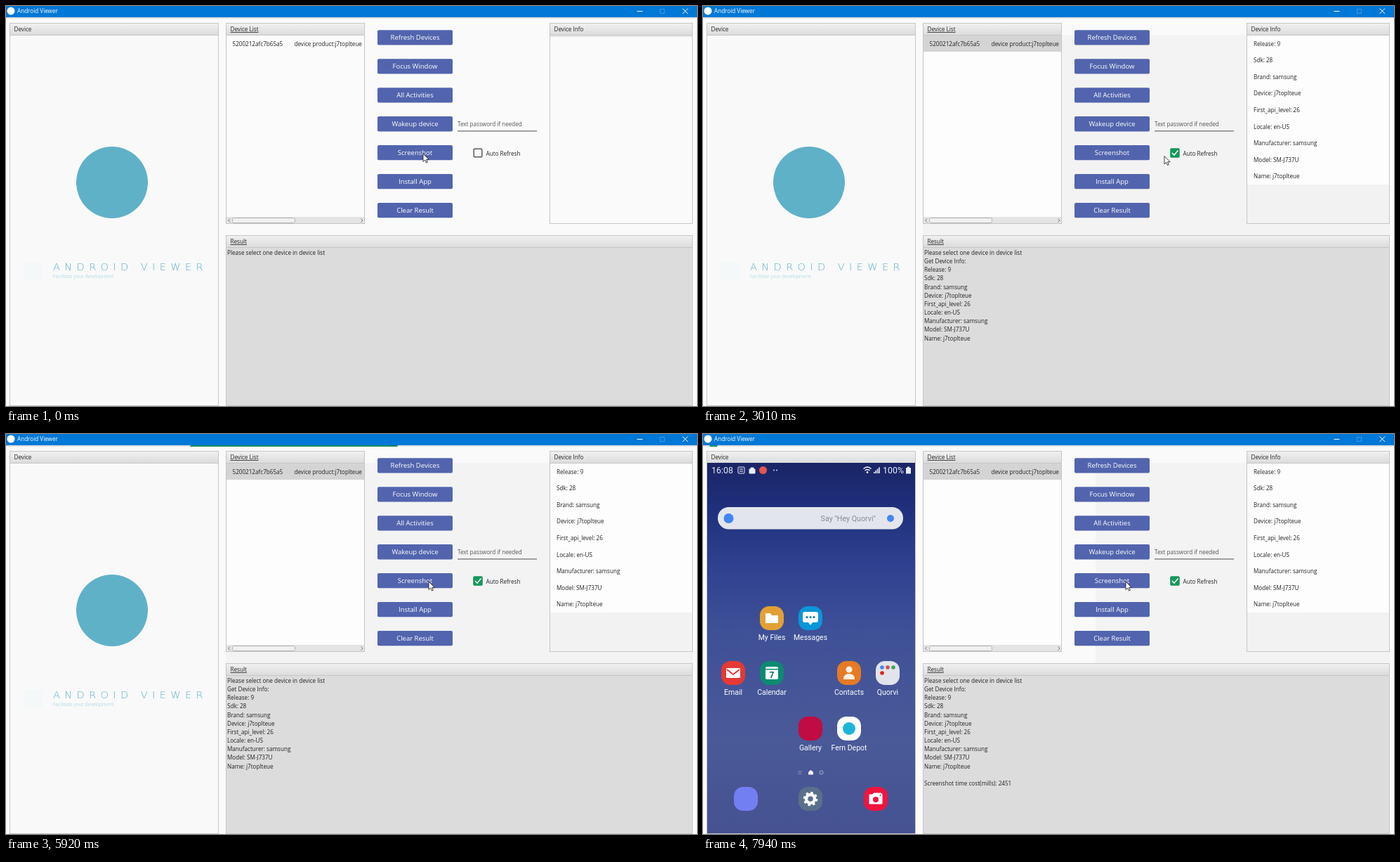
An HTML page for the animation above (8000 ms loop, 984 px wide and 569 px high).

```html
<!DOCTYPE html>
<html lang="en">
<head>
<meta charset="utf-8">
<title>Android Viewer</title>
<style>
  html, body { margin: 0; width: 100%; height: 100%; overflow: hidden; background: #fafafa; }
  svg { display: block; width: 984px; height: 569px; }
  text { font: 8.15px "Open Sans", "Noto Sans", sans-serif; fill: #222; white-space: pre; }
  .btn { font-size: 9.5px; fill: #fff; text-anchor: middle; }
  .app { font: 10.5px Roboto, sans-serif; fill: #fff; text-anchor: middle; }
  .status { font: 12.4px Roboto, sans-serif; fill: #e9ecf7; }
  .hint { font: 10.7px Roboto, sans-serif; fill: #858a99; }
  .brand { font: 200 14.5px "DejaVu Sans", sans-serif; letter-spacing: 6.4px; fill: #58b2c9; }
  .tag { font-size: 7px; font-weight: 300; fill: #8fcbdb; }
  .line { fill: none; stroke: #fff; }
</style>
</head>
<body>
<svg id="stage" viewBox="0 0 984 569">
  <defs>
    <linearGradient id="head" x2="0" y2="1">
      <stop stop-color="#f0f0f0"/><stop offset="1" stop-color="#dcdcdc"/>
    </linearGradient>
    <linearGradient id="wall" x2="0" y2="1">
      <stop stop-color="#1a2566"/><stop offset=".12" stop-color="#1f2f7b"/>
      <stop offset=".28" stop-color="#2f4190"/><stop offset=".45" stop-color="#3e5097"/>
      <stop offset=".75" stop-color="#4a5998"/><stop offset="1" stop-color="#465291"/>
    </linearGradient>
    <clipPath id="list"><rect x="314" y="42" width="196" height="267"/></clipPath>
    <clipPath id="shot"><rect x="529" y="198" width="107" height="21.3" rx="2"/></clipPath>
  </defs>
</svg>
<script>
const NS = 'http://www.w3.org/2000/svg';
const stage = document.getElementById('stage');

function add(tag, attrs, parent = stage, content) {
  const el = document.createElementNS(NS, tag);
  for (const k in attrs) el.setAttribute(k, attrs[k]);
  if (content) el.textContent = content;
  return parent.appendChild(el);
}
const group = (parent, attrs = {}) => add('g', attrs, parent);
const rect = (x, y, width, height, fill, parent, more) =>
  add('rect', { x, y, width, height, fill, ...more }, parent);
const disc = (cx, cy, r, fill, parent, more) => add('circle', { cx, cy, r, fill, ...more }, parent);
const path = (d, parent, more) => add('path', { d, ...more }, parent);
const label = (str, x, y, parent, more) => add('text', { x, y, ...more }, parent, str);
const show = (el, on) => el.setAttribute('display', on ? 'inline' : 'none');

function panel(x, y, w, h, title, fill, underline) {
  const body = rect(x + .5, y + .5, w - 1, h - 1, fill, stage, { stroke: '#c6c6c6' });
  rect(x + 1, y + 1, w - 2, 16, 'url(#head)');
  rect(x + 1, y + 17, w - 2, 1, '#c6c6c6');
  label(title, x + 6.5, y + 12, stage, underline ? { 'text-decoration': 'underline' } : {});
  return body;
}

// Window
rect(0, 0, 984, 569, '#fafafa');
const shade = rect(313, 41, 665, 285, '#f3f3f3');
rect(0, 0, 984, 16, '#0078d7');
rect(0, 16, 984, 2, '#e0e0e0');
disc(7, 7, 5.5, '#fff');
label('Android Viewer', 16, 10, stage, { style: 'fill:#fff' });
path('M898.5 7.5h8', stage, { class: 'line' });
rect(931.5, 4.5, 6, 6, 'none', stage, { stroke: '#3d98e2' });
path('M963.5 3.5l7.5 7.5m0-7.5l-7.5 7.5', stage, { class: 'line' });

// Device panel, empty state
panel(5, 24, 298, 545, 'Device', '#f9f9f9');
const splash = group(stage);
disc(151, 251, 51, '#5fb1c8', splash);
rect(25, 364, 28, 26, '#f5f8f8', splash);
label('ANDROID VIEWER', 67, 375.5, splash, { class: 'brand' });
label('Facilitate your development', 67, 387, splash, { class: 'tag' });

// Phone picture
const phone = group(stage);
rect(6, 41, 296, 527, 'url(#wall)', phone);
label('16:08', 12, 56, phone, { class: 'status' });
rect(50, 47, 9, 9, 'none', phone, { stroke: '#e9ecf7', rx: 1 });
path('M52 50h5m-5 3h5', phone, { class: 'line', 'stroke-width': 1 });
path('M66 50h8v6h-8zM68 50v-2h4v2', phone, { fill: '#e9ecf7', stroke: '#e9ecf7' });
disc(85.5, 51.5, 5.5, '#e2574c', phone);
disc(101, 51.5, .9, '#e9ecf7', phone);
disc(105, 51.5, .9, '#e9ecf7', phone);
path('M228.5 49.5q5.5-5 11 0m-9 2.5q3.5-3 7 0', phone, { class: 'line', 'stroke-width': 1.3 });
disc(234, 54.5, 1.4, '#e9ecf7', phone);
for (let i = 0; i < 4; i++) rect(243 + i * 2.4, 54 - i * 2.2, 1.6, 2 + i * 2.2, '#e9ecf7', phone);
label('100%', 256, 56, phone, { class: 'status' });
path('M289 48h2v-1.5h3V48h2v8.5h-7z', phone, { fill: '#e9ecf7' });

rect(21, 104, 264, 31.5, '#e3e5ec', phone, { rx: 15.7 });
disc(36.5, 120, 7, '#4285f4', phone);
label('Say "Hey Quorvi"', 246, 123.5, phone, { class: 'hint', 'text-anchor': 'end' });
disc(267, 120, 5, '#4285f4', phone);

function app(x, y, fill, name) {
  rect(x - 17, y - 17, 34, 34, fill, phone, { rx: 13 });
  if (name) label(name, x, y + 30.5, phone, { class: 'app' });
  return group(phone, { transform: `translate(${x} ${y})` });
}
const white = { fill: '#fff' };
path('M-9-7h7l2 3h9v11h-18z', app(98, 262, '#e2a034', 'My Files'), white);

const chat = app(153, 262, '#0a96d9', 'Messages');
path('M-8-9h16q3 0 3 3v9q0 3-3 3h-5l-3 4-3-4h-5q-3 0-3-3v-9q0-3 3-3z', chat, white);
for (const x of [-5, 0, 5]) disc(x, -1.5, 1.6, '#0a78b8', chat);

const mail = app(43, 340, '#e53935', 'Email');
rect(-10, -7, 20, 14, '#fff', mail, { rx: 1.5 });
path('M-9-5L0 2 9-5', mail, { class: 'line', style: 'stroke:#e53935;stroke-width:2' });

const cal = app(98, 340, '#0c8a72', 'Calendar');
rect(-9, -9, 18, 18, '#fff', cal, { rx: 2 });
rect(-9, -6, 18, 1.5, '#0c8a72', cal);
label('7', 0, 7, cal, { class: 'app', style: 'fill:#0c6f5d;font-weight:700;font-size:12px' });

const person = app(208, 340, '#e67a25', 'Contacts');
disc(0, -5, 4.5, '#fdf1e6', person);
path('M-8 9q0-8 8-8t8 8z', person, { fill: '#fdf1e6' });

const folder = app(263, 340, '#e2e4eb', 'Quorvi');
[[-8, -8, '#4285f4'], [0, -8, '#dc4b41'], [8, -8, '#34a853'], [-8, 0, '#e62117']]
  .forEach(([x, y, c]) => disc(x, y, 2.8, c, folder));

app(153, 419, '#c10b43', 'Gallery');
disc(0, 0, 9, '#1fb5d6', app(208, 419, '#fff', 'Fern Depot'));

path('M135.5 480h5m-5 3h5', phone, { class: 'line', opacity: .55, 'stroke-width': .8 });
path('M150 481l3.5-3 3.5 3v3.5h-7z', phone, white);
disc(168.5, 481.5, 2.5, 'none', phone, { stroke: '#fff', opacity: .55 });

app(61, 519, '#727ff2');
const gear = app(153, 519, '#5a708a');
disc(0, 0, 6, 'none', gear, { stroke: '#fff', 'stroke-width': 4.5 });
disc(0, 0, 9, 'none', gear, { stroke: '#fff', 'stroke-width': 2.5, 'stroke-dasharray': '3.53 3.54' });
const camera = app(246, 519, '#f0143f');
path('M-9-6h4l2-2h10q2 0 2 2v13h-18z', camera, { fill: '#fff', stroke: '#fff', 'stroke-linejoin': 'round' });
disc(0, 1, 4, '#f0143f', camera);
disc(6.5, -5, 1, '#f0143f', camera);

// Device list
const listBody = panel(313, 24, 198, 286, 'Device List', '#fbfbfb', true);
const list = group(stage, { 'clip-path': 'url(#list)' });
const row = rect(314, 42, 196, 23, '#0096c9', list);
const rowText = ['5200212afc7b65a5', 'device product:j7toplteue']
  .map((s, i) => label(s, [322.5, 410.5][i], 56.5, list));
rect(314, 300, 196, 9, '#e4e4e4', list);
rect(322.5, 301.5, 89, 7, '#f0f0f0', list, { stroke: '#b4b4b4', rx: 2 });
path('M319 302.5l-2.5 2.5 2.5 2.5M505.5 302.5l2.5 2.5-2.5 2.5', list, { fill: 'none', stroke: '#777' });
const focus = rect(313.5, 41.5, 197, 268, 'none', stage, { stroke: '#039ed3' });

// Buttons
['Refresh Devices', 'Focus Window', 'All Activities', 'Wakeup device', 'Screenshot', 'Install App', 'Clear Result']
  .forEach((name, i) => {
    const y = 34.3 + 40.94 * i;
    rect(529, y, 107, 21.3, '#5264ae', stage, { rx: 2 });
    if (i === 4) group(stage, { id: 'ripple', 'clip-path': 'url(#shot)' });
    label(name, 582.5, y + 13.8, stage, { class: 'btn' });
  });
const ripple = disc(603, 210, 0, '#fff', document.getElementById('ripple'));

label('Text password if needed', 643, 171, stage, { style: 'fill:#555' });
rect(643, 177.4, 113, 1, '#4d4d4d');
rect(666.2, 203.2, 11.6, 11.6, '#fafafa', stage, { stroke: '#5a5a5a', 'stroke-width': 1.5, rx: 1 });
const tick = group(stage);
rect(665.5, 202.5, 13, 13, '#0f9d58', tick, { rx: 1 });
path('M668 209l3 3 5.5-6.5', tick, { class: 'line', 'stroke-width': 1.6 });
label('Auto Refresh', 683.5, 212.5);

// Device info and result
const facts = ['Release: 9', 'Sdk: 28', 'Brand: samsung', 'Device: j7toplteue', 'First_api_level: 26',
  'Locale: en-US', 'Manufacturer: samsung', 'Model: SM-J737U', 'Name: j7toplteue'];
const infoBody = panel(774, 24, 204, 286, 'Device Info', '#fafafa');
rect(775, 42, 202, 2, '#e6e6e6');
panel(313, 326, 665, 243, 'Result', '#dcdcdc', true);
const logLine = (s, i, parent) => label(s, 315, 354 + 12.15 * i, parent);
logLine('Please select one device in device list', 0, stage);
const info = group(stage);
rect(775, 42, 202, 212, '#fdfdfd', info);
facts.forEach((s, i) => {
  label(s, 784, 56.5 + 23.6 * i, info);
  logLine(s, i + 2, info);
});
logLine('Get Device Info:', 1, info);
const cost = logLine('Screenshot time cost(mills): 2451', 12, stage);

const bar = rect(0, 16, 0, 2, '#0f8f5c');
const cursor = path('M0 0V11.5L2.7 9 4.5 13 6.3 12.2 4.6 8.3H8.2Z', stage,
  { fill: '#fff', stroke: '#111', 'stroke-width': .8 });

// Timing
const LOOP = 8000;
const STEPS = [0,
  300, 430, 560, 690, 820, 950, 1080,
  1520, 1660, 1800, 1940, 2080, 2220, 2360, 2500,
  2630, 2760, 2890, 3020, 3150, 3280,
  3560, 3710, 3840, 3980, 4120, 4270, 4410, 4560,
  4710, 4850, 4990, 5130, 5260, 5390, 5510, 5640,
  5790, 5920, 6060, 6180, 6320, 6460, 6600, 6740,
  6890, 7020, 7160, 7290, 7420, 7550, 7690, 7820, 7940];
const MOVE = [[0, 594, 210], [299, 594, 210], [300, 611, 204], [430, 606, 188], [690, 510, 100],
  [950, 446, 55], [1080, 440, 51], [1660, 440, 51], [1940, 530, 112], [2220, 655, 202], [2360, 672, 211],
  [2500, 674, 214], [2760, 674, 214], [3020, 640, 213], [3280, 602, 210], [LOOP, 602, 210]];
// Turns of the progress bar
const FIRST_RUN = [[3710, .0733], [4990, 1.4012], [5640, 2.089], [5920, 2.3773]];
const NEXT_RUN = [[6060, .0621], [7020, 1.0532], [7940, 2.0138]];

function at(keys, t, col = 1) {
  let i = 1;
  while (i < keys.length - 1 && keys[i][0] < t) i++;
  const a = keys[i - 1], b = keys[i];
  return a[col] + (b[col] - a[col]) * (t - a[0]) / (b[0] - a[0]);
}

function drawBar(t) {
  const W = 978;
  const p = at(t < 6060 ? FIRST_RUN : NEXT_RUN, t) % 1;
  const mid = Math.min(p / .9, 1) * W;
  const half = .4 * Math.min(p, 1 - p) * W;
  const left = Math.max(0, mid - half);
  bar.setAttribute('x', left);
  bar.setAttribute('width', Math.min(W, mid + half) - left);
}

function draw(time) {
  const t = STEPS.findLast(s => s <= time);
  const chosen = t >= 1520, focused = chosen && t < 2500;
  const known = t >= 1800, shot = t >= 6060, busy = t >= 3710;

  show(shade, chosen);
  shade.setAttribute('x', shot ? 559 : 313);
  shade.setAttribute('width', shot ? 419 : 665);
  show(row, chosen);
  row.setAttribute('fill', focused ? '#0096c9' : '#d4d4d4');
  rowText.forEach(el => el.style.fill = focused ? '#fff' : '#222');
  listBody.setAttribute('fill', chosen ? '#fdfdfd' : '#fbfbfb');
  show(focus, focused);
  show(info, known);
  infoBody.setAttribute('fill', known ? '#f2f2f2' : '#fafafa');
  show(tick, t >= 2630);
  show(splash, !shot);
  show(phone, shot);
  show(cost, shot);

  ripple.setAttribute('r', t < 3560 ? 0 : t < 3710 ? 40 : 90);
  ripple.setAttribute('opacity', t < 3560 ? 0 : t < 3840 ? .21 : t < 3980 ? .09 : 0);
  show(bar, busy);
  if (busy) drawBar(t);
  cursor.setAttribute('transform', `translate(${at(MOVE, t, 1)} ${at(MOVE, t, 2)})`);
}

const start = performance.now();
function tickFrame() {
  draw((performance.now() - start) % LOOP);
  requestAnimationFrame(tickFrame);
}
tickFrame();
</script>
</body>
</html>
```
